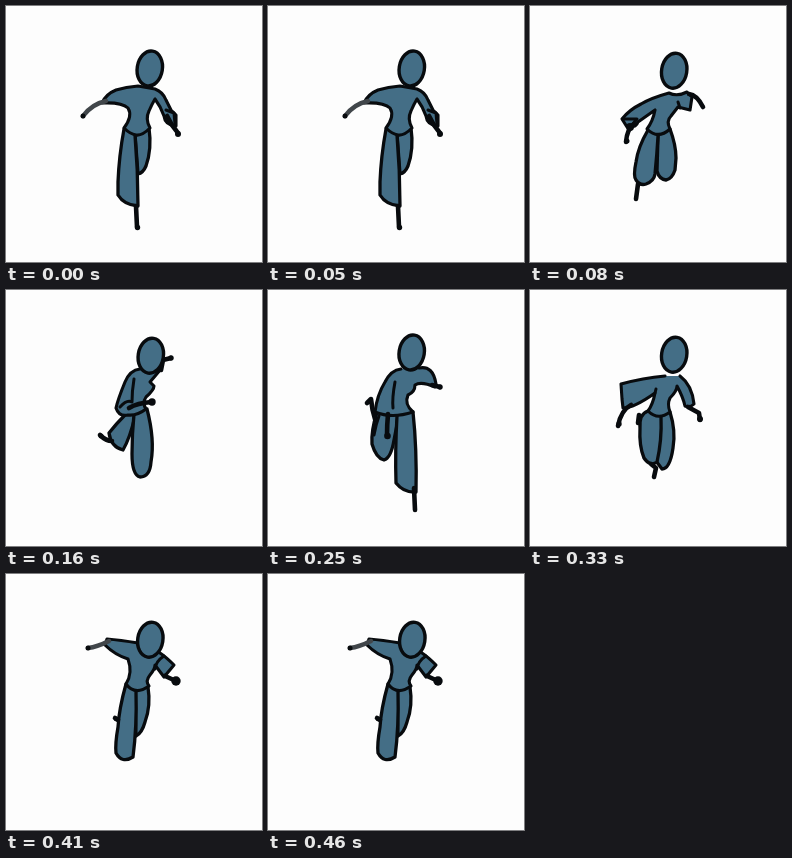
An HTML page with a canvas for the animation above (0.5 s loop, 256 px wide and 256 px high).

```html
<!DOCTYPE html>
<html lang="en">
<head>
<meta charset="utf-8">
<title>Running figure</title>
<style>
html, body { margin: 0; height: 100%; overflow: hidden; background: #fdfdfd; }
canvas { display: block; width: 100vw; height: 100vh; filter: blur(.65px); }
</style>
</head>
<body>
<canvas width="256" height="256"></canvas>
<script>
const ctx = document.querySelector('canvas').getContext('2d');
const BLUE = '#446e86', INK = '#080b0e', SOFT = '#41464a';

// ms: hold time, head: centre, legs and torso: filled outlines,
// lines: inner creases, limbs: hands and feet, dots: [x, y, radius]
const poses = [
  {
    ms: 80, head: [143.8, 62.5],
    legs: ['M143 122Q146 143 140 160Q137 167 132 168L129 128',
      'M118 123Q113 150 112 176L112 189Q118 199 132 200Q132 164 129 129'],
    torso: 'M96 97Q100 88 110 84Q120 81 132 80L149 83Q157 86 160 94L165 104L170 109L170 120Q159 119 158 110Q155 101 149 93Q146 98 143 105Q139 113 144 122Q136 130 130 129Q124 128 118 122Q127 110 122 102Q116 96 96 97',
    lines: 'M160 104L168 107L169 118',
    soft: 'M100 95Q86 98 77 110',
    limbs: 'M161 110Q165 119 172 127M130 200L131 221',
    dots: [[172, 128, 3], [131.5, 221.5, 2.7], [77, 110, 2.5]]
  },
  {
    ms: 80, head: [144.2, 64.7],
    legs: ['M140 123Q146 139 146 152L145 164Q142 173 136 174Q129 173 127 165L128 130',
      'M118 124Q108 141 106 156Q103 170 106 174Q110 180 116 178Q124 175 125 168Q127 148 128 130'],
    torso: 'M139 87Q121 92 111 98Q99 104 92 113L97 121Q106 122 108 116L125 104Q123 115 117 123Q128 134 140 123Q136 115 141 110L148 101L160 104L162 91L157 86Q147 91 139 87',
    lines: 'M148 96L150 102M94 113L107 113L101 120',
    limbs: 'M104 118Q97 123 96 136M159 88Q167 89 173 101M108 178L106 193',
    dots: [[100, 121, 4], [97, 135, 2.5]]
  },
  {
    ms: 90, head: [144.8, 65.7],
    legs: ['M119 125Q110 134 103 143Q105 157 117 160Q124 148 129 126',
      'M128 124Q126 144 126 164Q126 185 134 187Q144 187 145 172Q149 150 141 119'],
    torso: 'M134 79Q124 80 119 92Q112 109 110 118Q113 127 122 125Q131 126 140 119Q136 113 140 107Q148 100 148 96L144 92L155 79',
    lines: 'M128 89Q126 101 126 112Q121 109 114 117',
    limbs: 'M123 118Q131 113 146 112M155 80L157 70L165 68M106 151Q100 151 94 145',
    dots: [[146, 112, 3.7], [165, 68, 2.7], [95, 146, 2.5]]
  },
  {
    ms: 80, head: [143.7, 62.5],
    legs: ['M109 122Q103 141 104 154Q108 168 116 170Q123 168 126 150Q129 137 130 126',
      'M129 126Q127 161 128 193Q136 203 148 202Q149 159 145 122'],
    torso: 'M133 79Q123 80 117 92Q109 105 107 122Q124 129 145 122Q136 114 140 105Q147 102 147 95Q153 91 167 97L168 94Q165 75 151 78',
    lines: 'M127 92Q124 108 125 118M106 145Q108 134 111 126',
    limbs: 'M120 124Q119 135 119 146M164 95L172 97M107 129Q104 120 103 109L99 113M146 198L147 220',
    dots: [[119.5, 146, 3.3], [172, 97, 2.7]]
  },
  {
    ms: 80, head: [144.2, 64.7],
    legs: ['M140 122Q146 141 143 158Q140 179 132 179L126 171L130 126',
      'M118 121Q109 124 110 138Q109 156 114 168Q120 177 127 172Q132 150 131 127'],
    torso: 'M135 86Q113 88 91 94L92 109L93 118Q104 118 125 103Q123 114 118 121Q128 131 140 122Q137 114 140 108Q147 101 147 96Q153 107 155 116Q160 118 164 114Q162 95 150 86',
    lines: 'M125 103L126 99',
    limbs: 'M101 115Q91 120 88 136M158 117L169 123L170 130M121 174L126 178L124 187M109 125L108 133',
    dots: [[170, 129, 3], [89, 134, 2.7]]
  },
  {
    ms: 90, head: [144.3, 65.7],
    legs: ['M142 113Q145 132 139 148Q136 159 130 162L129 119',
      'M120 110Q113 135 112 153Q109 170 110 179Q116 190 127 183Q131 152 130 118'],
    torso: 'M132 69Q114 66 101 65L99 71Q109 81 122 85Q127 99 120 110Q129 122 143 112Q139 107 144 101Q149 95 149 91L158 103L168 91Q160 83 154 79',
    lines: 'M149 95Q150 87 158 82',
    soft: 'M103 67Q91 73 82 74',
    limbs: 'M159 102L170 107M109 144L112 146',
    dots: [[170, 107, 4.7], [82, 74, 2.5], [110, 145, 2.2]]
  }
];
const loop = poses.reduce((sum, p) => sum + p.ms, 0);

function trace(d, width, color = INK, fill) {
  const path = new Path2D(d);
  if (fill) {
    ctx.fillStyle = fill;
    ctx.fill(path);
  }
  ctx.lineWidth = width;
  ctx.strokeStyle = color;
  ctx.stroke(path);
}

function oval(x, y, rx, ry, tilt, fill) {
  ctx.beginPath();
  ctx.ellipse(x, y, rx, ry, tilt, 0, 7);
  ctx.fillStyle = fill;
  ctx.fill();
}

function draw(p) {
  ctx.clearRect(0, 0, 256, 256);
  ctx.lineCap = ctx.lineJoin = 'round';
  p.legs.forEach(d => trace(d, 3.3, INK, BLUE));
  trace(p.torso, 3.1, INK, BLUE);
  trace(p.lines, 3);
  if (p.soft) trace(p.soft, 4.5, SOFT);
  trace(p.limbs, 4.6);
  p.dots.forEach(([x, y, r]) => oval(x, y, r, r, 0, INK));
  oval(...p.head, 12.6, 17.6, .16, BLUE);
  ctx.lineWidth = 3.4;
  ctx.strokeStyle = INK;
  ctx.stroke();
}

function tick(now) {
  let t = now % loop, i = 0;
  while (t >= poses[i].ms) t -= poses[i++].ms;
  draw(poses[i]);
  requestAnimationFrame(tick);
}
tick(0);
</script>
</body>
</html>
```
